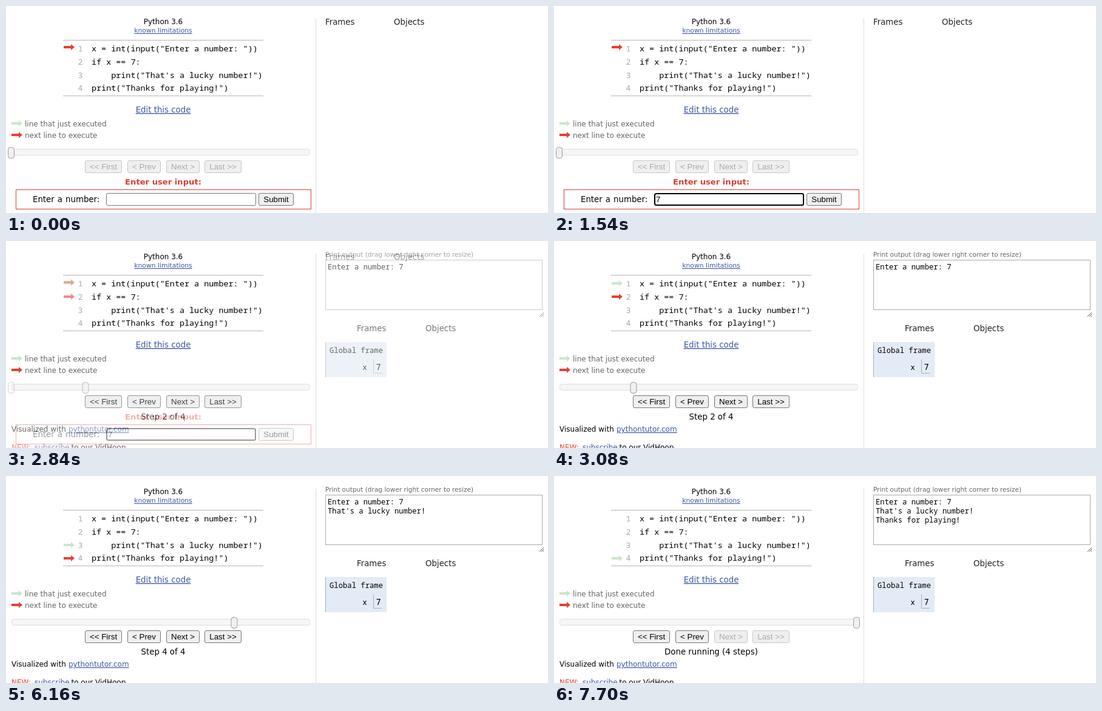
An HTML page that plays this animation: 893 px wide and 342 px high, repeating every 9700 ms.

```html
<!DOCTYPE html>
<html lang="en">
<head>
<meta charset="utf-8">
<title>Stepping through a Python program</title>
<style>
  html, body { margin: 0; width: 100%; height: 100%; overflow: hidden; background: #fff; }
  svg { display: block; font: 13.33px "DejaVu Sans", sans-serif; }
  text { white-space: pre; }
  .mid { text-anchor: middle; }
  .link { fill: #3d58a2; text-decoration: underline; }
  .code { font: 13.43px "Noto Sans Mono", monospace; }
  .out { font: 12.22px "Noto Sans Mono", monospace; }
  .ui { font: 13.33px "Liberation Sans", Arial, sans-serif; }
  .s12 { font-size: 12px; }
  .s11 { font-size: 10.8px; }
  .s10 { font-size: 10.55px; }
  .gray { fill: #666; }
  .dim { fill: #aaa; }
  .dark { fill: #222; }
</style>
</head>
<body>
<svg id="stage" width="893" height="342" viewBox="0 0 893 342"></svg>
<script>
const RED = '#e93f34', GREEN = '#c9e6ca', ALERT = '#d93f33';
const HOLD = 1000, FADE = 540, TICK = 60, LOOP = 9700;

const code = ['x = int(input("Enter a number: "))', 'if x == 7:',
  '    print("That\'s a lucky number!")', 'print("Thanks for playing!")'];
const output = ['Enter a number: 7', "That's a lucky number!", 'Thanks for playing!'];
const codeY = [75, 97, 119, 140];
const buttons = [[130, 61, '<< First'], [200, 55, '< Prev'], [264, 55, 'Next >'], [327, 61, 'Last >>']];

// done / next: line numbers; lines: printed lines; off: disabled buttons
const states = [
  { next: 1, pos: 0, off: [0, 1, 2, 3], ask: true },
  { next: 1, pos: 0, off: [0, 1, 2, 3], ask: true, typed: true },
  { done: 1, next: 2, pos: 1, off: [], lines: 1, status: 'Step 2 of 4' },
  { done: 2, next: 3, pos: 2, off: [], lines: 1, status: 'Step 3 of 4' },
  { done: 3, next: 4, pos: 3, off: [], lines: 2, status: 'Step 4 of 4' },
  { done: 4, pos: 4, off: [2, 3], lines: 3, status: 'Done running (4 steps)' }
];

const esc = s => s.replace(/&/g, '&amp;').replace(/</g, '&lt;');
const text = (x, y, s, cls = '', extra = '') =>
  `<text x="${x}" y="${y}" class="${cls}" ${extra}>${esc(s)}</text>`;
const rect = (x, y, w, h, fill, stroke = 'none', r = 0, lw = 1) =>
  `<rect x="${x}" y="${y}" width="${w}" height="${h}" rx="${r}" fill="${fill}" stroke="${stroke}" stroke-width="${lw}"/>`;
const path = (d, stroke) => `<path d="${d}" fill="none" stroke="${stroke}"/>`;
const arrow = (x, cy, fill) =>
  `<path transform="translate(${x} ${cy - 5})" d="M0 3H12V0L18 5 12 10V7H0Z" fill="${fill}"/>`;
const button = (x, y, w, label, off) =>
  rect(x + .5, y + .5, w - 1, 20, '#efefef', off ? '#c8c8c8' : '#767676', 2.5) +
  text(x + w / 2, y + 15, label, 'ui mid ' + (off ? 'dim' : ''));

function left(s) {
  const lineY = n => 48 + 22 * n;
  return text(259, 30, 'Python 3.6', 'mid s12') +
    text(259, 44, 'known limitations', 'mid link s11') +
    path('M94 56.5H424M94 148.5H424', '#b5b5b5') +
    code.map((c, i) => text(118.5, codeY[i], String(i + 1), 'code dim') + text(141, codeY[i], c, 'code')).join('') +
    (s.done ? arrow(95, lineY(s.done), GREEN) : '') +
    (s.next ? arrow(95, s.ask ? 68 : lineY(s.next), RED) : '') +
    text(259, 176, 'Edit this code', 'mid link') +
    arrow(9, 194, GREEN) + text(31, 199, 'line that just executed', 's12 gray') +
    arrow(9, 213, RED) + text(31, 218, 'next line to execute', 's12 gray') +
    rect(9.5, 236.5, 491, 10, '#f6f6f6', '#ddd', 4) +
    rect(3.5 + 122.5 * s.pos, 233.5, 10, 18, '#f0f0f0', '#999', 4) +
    buttons.map(([x, w, label], i) => button(x, 255, w, label, s.off.includes(i))).join('');
}

function prompt(s) {
  return text(259, 295, 'Enter user input:', 'mid', `fill="${ALERT}" style="font-weight:bold;font-size:13.15px"`) +
    rect(16.5, 303.5, 486, 32, '#fff', ALERT) +
    text(44, 324, 'Enter a number:', '', 'word-spacing=".8"') +
    (s.typed
      ? rect(166, 310, 245, 19, '#fff', '#000', 2.5, 2) + text(168, 324, '7', 'ui')
      : rect(165.5, 309.5, 246, 20, '#fff', '#767676', 2)) +
    button(416, 309, 58, 'Submit');
}

function footer(s) {
  return text(259, 295, s.status, 'mid') +
    text(9, 315, 'Visualized with', 's12') + text(103, 315, 'pythontutor.com', 'link s12') +
    text(9, 345, 'NEW:', 's12', `fill="${RED}"`) + text(47, 345, 'subscribe', 'link s12') +
    text(107.5, 345, 'to our VidHoop', 's12');
}

function headings(x, y) {
  return text(x, y, 'Frames', 'dark') + text(x + 113, y, 'Objects', 'dark');
}

function result(s) {
  return text(526, 26, 'Print output (drag lower right corner to resize)', 's10 gray') +
    rect(526.5, 31.5, 357, 82, '#fff', '#aaa') +
    output.slice(0, s.lines).map((l, i) => text(530, 47 + 15 * i, l, 'out')).join('') +
    path('M879 125L886 118M882 125L886 121M885 125L886 124', '#555') +
    headings(578, 149) +
    rect(526, 167, 101, 58, '#e2ebf6') + path('M526.5 167V225M605.5 196V218.5H619', '#a6b3b6') +
    text(533, 185, 'Global frame', 'out') +
    text(587.5, 213, 'x', 's12') + text(609.5, 213, '7');
}

const stage = document.getElementById('stage');
stage.innerHTML = states.map(s => '<g>' + rect(0, 0, 893, 342, '#fff') + left(s) +
  path('M510.5 21V342', '#ddd') +
  (s.ask ? prompt(s) + headings(526, 31) : footer(s) + result(s)) + '</g>').join('');
const layers = [...stage.children];

function draw(now) {
  const t = now % LOOP, span = HOLD + FADE;
  const cur = Math.min(states.length - 1, Math.floor(t / span));
  const fading = t - cur * span - HOLD;
  const mix = fading < 0 ? 0 : (Math.floor(fading / TICK) + 1) / 10;
  layers.forEach((g, i) => {
    g.style.display = i === cur || (i === cur + 1 && mix) ? '' : 'none';
    g.style.opacity = i === cur ? 1 : mix;
  });
}

let start;
function tick(now) {
  start ??= now;
  draw(now - start);
  requestAnimationFrame(tick);
}
draw(0);
requestAnimationFrame(tick);
</script>
</body>
</html>
```
